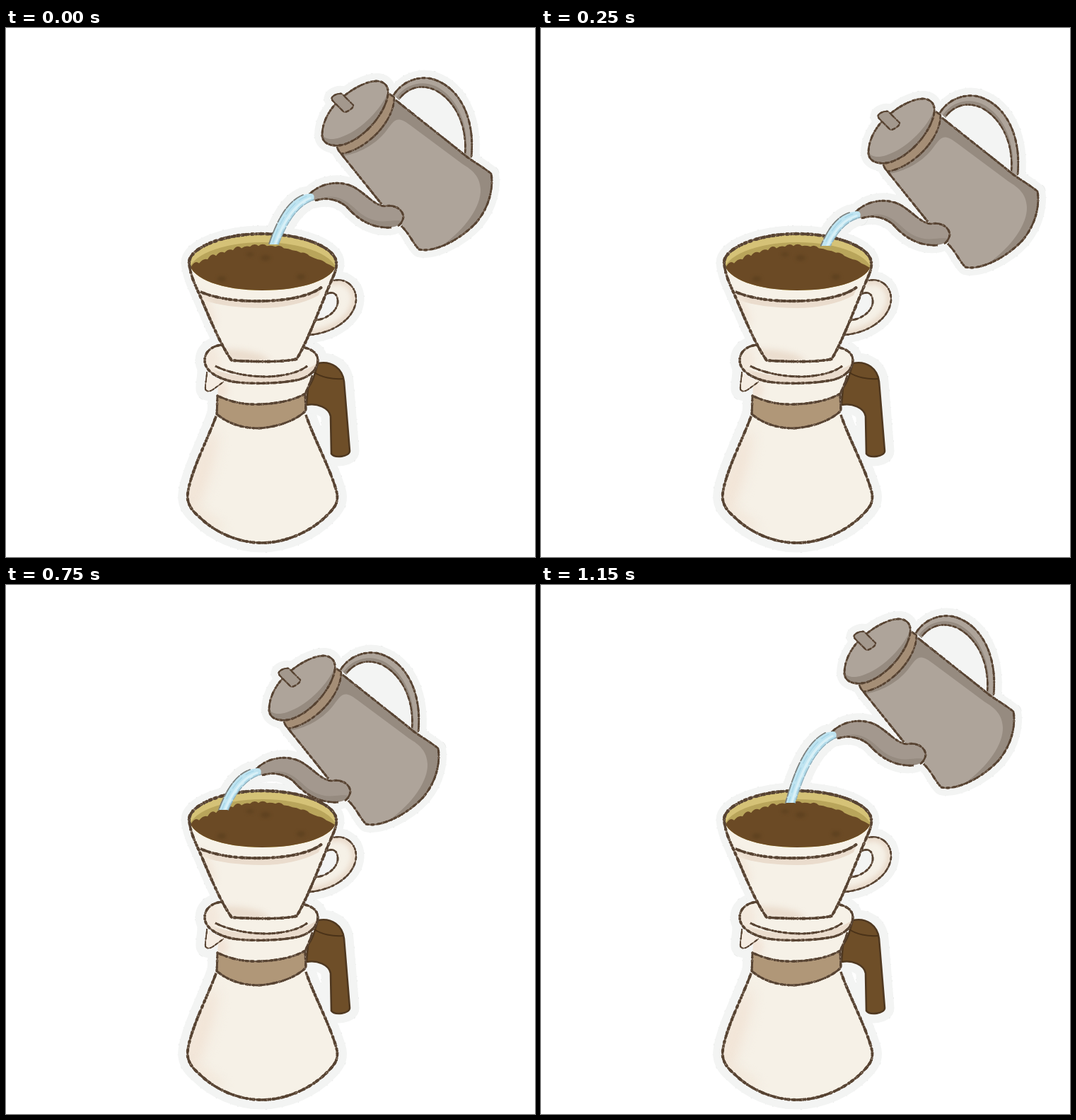
Animation of 748x748 px, one loop 1.25 s. Source, as an HTML page with a canvas:

```html
<!DOCTYPE html>
<html lang="en">
<head>
<meta charset="utf-8">
<title>Pour-over coffee</title>
<style>
html, body { margin: 0; width: 100%; height: 100%; overflow: hidden; background: #fff; }
canvas { display: block; width: 100vw; height: 100vh; }
</style>
</head>
<body>
<canvas id="stage" width="748" height="748"></canvas>
<script>
const ctx = document.getElementById('stage').getContext('2d');
const P = d => new Path2D(d);
const STEP = 250;

const CREAM = '#f6f1e7', TAN = '#eadccd', LINE = '#574332';
const STEEL = '#aea49a', SHADE = '#968b80', HALO = '#f3f4f3';

// Kettle offset and the point where the water lands
const poses = [
  { dx: 0, dy: 0, x: 378, y: 306 },
  { dx: 16, dy: 25, x: 402, y: 308 },
  { dx: -30, dy: 19, x: 354, y: 307 },
  { dx: -75, dy: 25, x: 307, y: 318 },
  { dx: -18, dy: -27, x: 352, y: 308 }
];

// Seeded dash pattern for the grain of the pencil
function grain(seed, on, off) {
  const rnd = () => (seed = seed * 16807 % 2147483647) / 2147483647;
  return Array.from({ length: 60 }, (_, i) => (0.3 + 1.4 * rnd()) * (i % 2 ? off : on));
}
const DARK = grain(71, 9, 2), FLECK = grain(5, 1.4, 13), ROUGH = grain(913, 3, 4);

const cup = {
  cone: P('M259 332 C258 312 305 291 362 291 C420 291 468 311 467 333 C467 342 462 351 459 360 C444 395 426 444 411 468 C390 473 350 472 319 470 C300 443 285 402 270 369 C264 356 260 345 259 332Z'),
  mouth: P('M259 332 C258 312 305 291 362 291 C420 291 468 311 467 333 C465 355 420 371 362 371 C307 371 262 355 259 332Z'),
  rim: P('M259 332 C258 312 305 291 362 291 C420 291 468 311 467 333'),
  sides: P('M259 332 C260 345 264 356 270 369 C285 402 300 443 319 470 C350 472 390 473 411 468 C426 444 444 395 459 360 C464 348 468 341 467 333'),
  lip: P('M275 373 C300 384 335 387 366 386 C402 385 432 378 447 366'),
  lipShade: P('M274 373 C300 384 335 387 366 386 C402 385 432 378 447 366 L442 378 C420 390 390 396 362 396 C330 396 300 392 280 385Z'),
  handle: P('M461 357 C480 352 496 365 495 385 C493 411 462 432 427 434 L439 411 C452 411 466 402 469 389 C470 377 463 371 453 376Z'),
  handleOut: P('M463 357 C481 353 496 366 495 385 C493 411 462 432 428 434'),
  handleIn: P('M454 376 C464 371 470 378 469 389 C467 402 452 412 438 413'),
  hole: P('M453 376 C464 371 470 378 469 389 C467 402 452 412 438 413Z')
};

const pot = {
  flask: P('M297 547 C286 580 261 627 257 658 C255 671 262 682 273 691 C295 713 328 728 362 728 C398 728 434 710 455 688 C466 677 470 670 468 658 C460 625 435 580 424 545Z'),
  flaskLine: P('M297 549 C286 580 261 627 257 658 C255 671 262 682 273 691 C295 713 328 728 362 728 C398 728 434 710 455 688 C466 677 470 670 468 658 C460 625 435 580 424 547'),
  neck: P('M301 490 L299 524 C340 536 390 533 423 519 C426 506 433 497 435 482Z'),
  neckRight: P('M433 491 C431 501 426 508 423 518'),
  band: P('M299 520 C320 530 340 533 360 532 C385 531 408 526 423 517 L424 541 C410 555 385 564 358 566 C335 566 315 560 298 546Z'),
  collar: P('M281 470 C281 459 289 451 302 449 L419 451 C433 454 441 460 441 470 C440 483 431 492 415 497 C390 503 345 504 320 500 C298 495 281 485 281 470Z'),
  collarLine: P('M305 448 C289 450 281 459 281 470 C281 485 298 495 320 500 C345 504 390 503 415 497 C431 492 440 483 441 470 C441 460 432 453 417 451'),
  collarIn: P('M296 478 C318 489 345 493 370 493 C395 492 414 487 426 478'),
  collarShade: P('M283 478 C310 492 345 494 370 493 C400 492 422 486 440 474 C437 489 425 495 415 497 C390 503 345 504 320 500 C300 496 286 489 283 478Z'),
  spout: P('M284 485 C284 495 281 505 282 511 C284 515 289 514 293 511 L309 500 C298 496 288 491 284 485Z'),
  spoutLine: P('M284 486 C284 495 281 505 282 511 C284 515 289 514 293 511 L308 500'),
  grip: P('M441 474 C461 470 476 482 478 500 L486 598 C486 606 465 609 460 602 L459 549 C457 537 440 530 425 533 L427 509 C434 500 435 493 437 488 Z'),
  gripFold: P('M436 487 C446 494 462 497 476 496')
};

const kettle = {
  body: P('M467 166 L474 178 L533 250 L562 281 C570 290 575 304 584 313 C604 318 641 301 665 275 C686 250 689 221 686 206 C670 193 656 187 643 175 L549 101Z'),
  bodyLine: P('M474 178 L531 249 M559 280 C570 290 575 304 584 313 C604 318 641 301 665 275 C686 250 689 221 686 206 C670 193 656 187 643 175 L551 102'),
  bodyShade: P('M549 100 L643 175 C656 187 670 193 686 206 C690 225 684 252 665 275 C650 292 630 303 616 308 C650 284 672 252 671 228 C670 210 660 201 645 192 L571 137 C553 124 550 129 538 145 C525 162 504 176 477 181 L474 178 C516 168 545 130 549 100Z'),
  band: P('M467 166 C500 166 538 125 540 92 L549 98 C549 132 510 172 474 178 C471 175 469 171 467 166Z'),
  bandLine: P('M468 168 C469 172 471 175 474 178 C510 172 549 132 549 98 L542 93'),
  lid: P('M447 152 C447 135 455 118 470 103 C487 87 510 74 526 75 C540 77 543 88 538 103 C530 128 505 155 480 164 C465 169 448 166 447 152Z'),
  lidShade: P('M447 150 C450 157 459 159 472 155 C500 146 526 119 538 96 L538 103 C530 128 505 155 480 164 C465 169 448 166 447 150Z'),
  knob: P('M461 98 C464 94 471 92 475 93 L491 109 C492 113 483 119 478 119 L463 104 C461 102 460 100 461 98Z'),
  handle: P('M548 95 C560 75 585 66 606 73 C645 87 663 132 658 185 L649 179 C652 138 635 101 605 87 C588 80 570 84 556 102Z'),
  handleShade: P('M552 98 C566 78 589 74 607 82 C638 97 655 136 651 180 L648 178 C652 138 635 101 605 87 C588 80 570 84 556 102Z'),
  handleOut: P('M548 95 C560 75 585 66 606 73 C645 87 663 132 658 183'),
  handleIn: P('M557 99 C570 83 588 80 605 87 C635 101 652 138 649 177'),
  loop: P('M549 98 C560 75 585 66 606 73 C645 87 663 132 658 185 L645 178Z'),
  spout: P('M429 235 C445 219 470 215 490 224 C508 233 519 250 535 252 C547 249 561 255 562 267 C561 276 550 282 540 282 C515 284 495 268 481 252 C468 242 453 239 436 244 C431 243 428 239 429 235Z'),
  spoutLine: P('M429 235 C445 219 470 215 490 224 C508 233 519 250 535 252 C547 249 561 255 562 267 C561 273 558 278 554 280 M545 282 C515 284 495 268 481 252 C468 242 453 239 437 244'),
  spoutShade: P('M440 242 C462 234 477 240 491 253 C508 270 523 275 540 273 C549 272 556 272 560 273 C556 280 548 282 540 282 C515 284 495 268 481 252 C468 242 453 239 440 242Z')
};

function fill(path, color) {
  ctx.fillStyle = color;
  ctx.fill(path);
}

function stroke(path, color, width, dash = []) {
  ctx.strokeStyle = color;
  ctx.lineWidth = width;
  ctx.setLineDash(dash);
  ctx.stroke(path);
  ctx.setLineDash([]);
}

// Dry pencil line: solid core, uneven dark edge, a few pale flecks
function ink(path, w = 3.4) {
  ctx.lineCap = 'butt';
  stroke(path, '#6f5c4c', w * 0.8);
  stroke(path, LINE, w, DARK);
  stroke(path, LINE, w * 1.2, ROUGH);
  stroke(path, '#9c8a79', w * 0.4, FLECK);
  ctx.lineCap = 'round';
}

function halo(paths, width) {
  ctx.lineCap = 'butt';
  for (const p of paths) stroke(p, '#e3e4e3', width + 1, FLECK);
  ctx.lineCap = 'round';
  for (const p of paths) {
    stroke(p, HALO, width);
    fill(p, HALO);
  }
}

function within(path, draw) {
  ctx.save();
  ctx.clip(path);
  draw();
  ctx.restore();
}

function blot(x, y, rx, ry, color, blur = 0, turn = 0) {
  ctx.save();
  if (blur) ctx.filter = `blur(${blur}px)`;
  ctx.fillStyle = color;
  ctx.beginPath();
  ctx.ellipse(x, y, rx, ry, turn, 0, 7);
  ctx.fill();
  ctx.restore();
}

// Coffee with a scalloped upper edge
function groundsPath() {
  const p = P('M261 343');
  const n = 17;
  let px = 261;
  for (let i = 0; i <= n; i++) {
    const u = i / n * 2 - 1;
    const x = 363 + 102 * u;
    const y = 308 + 31 * Math.pow(Math.abs(u), 1.8);
    p.quadraticCurveTo((x + px) / 2, y - 4 - 2 * Math.sin(i * 2.4), x, y);
    px = x;
  }
  p.bezierCurveTo(463, 358, 418, 371, 362, 371);
  p.bezierCurveTo(308, 371, 266, 357, 261, 343);
  return p;
}
const grounds = groundsPath();

function drawPot() {
  fill(pot.grip, '#6e4e28');
  stroke(pot.grip, '#4f3820', 2.6);
  stroke(pot.gripFold, '#4a3218', 2);

  fill(pot.flask, CREAM);
  within(pot.flask, () => {
    blot(272, 640, 12, 75, '#f1e3d5', 9, 0.32);
    blot(284, 693, 30, 6, '#f2e6d8', 7, 0.6);
  });
  ink(pot.flaskLine);

  fill(pot.neck, CREAM);
  within(pot.neck, () => blot(302, 512, 12, 12, '#f1e3d6', 5));
  ink(pot.neckRight, 2.4);
  fill(pot.band, '#b09778');
  ink(pot.band, 2.8);

  fill(pot.spout, '#f5ece2');
  ink(pot.spoutLine, 1.7);
  fill(pot.collar, CREAM);
  fill(pot.collarShade, TAN);
  within(pot.collar, () => blot(290, 470, 12, 18, '#f3e8dc', 5));
  ink(pot.collarLine, 3);
  ink(pot.collarIn, 2.6);
}

function drawCup() {
  fill(cup.handle, CREAM);
  within(cup.handle, () => {
    ctx.filter = 'blur(3px)';
    stroke(cup.handleOut, TAN, 14);
  });
  ink(cup.handleOut, 2.2);
  fill(cup.hole, HALO);
  ink(cup.handleIn, 2.4);

  fill(cup.cone, CREAM);
  within(cup.cone, () => {
    fill(cup.lipShade, TAN);
    blot(334, 464, 38, 8, TAN, 4, 0.15);
    blot(285, 397, 7, 26, '#f2e7da', 5, -0.4);
  });
  ink(cup.lip);

  fill(cup.mouth, '#d5c277');
  within(cup.mouth, () => {
    blot(363, 346, 105, 43, '#b9a55b');
    fill(grounds, '#6b4a25');
    const spots = [[367, 325, 7, 4], [305, 355, 6, 4], [417, 352, 6, 4], [345, 320, 5, 3]];
    for (const [x, y, rx, ry] of spots) blot(x, y, rx, ry, '#5f4220', 2);
  });
  ink(cup.sides);
  ink(cup.rim, 3.8);
}

function drawKettle() {
  fill(kettle.handle, STEEL);
  fill(kettle.handleShade, SHADE);
  ink(kettle.handleOut, 2.5);
  ink(kettle.handleIn, 2.1);

  fill(kettle.body, STEEL);
  fill(kettle.bodyShade, SHADE);
  ink(kettle.bodyLine, 2.6);

  fill(kettle.band, '#a58e76');
  ink(kettle.bandLine, 2.3);
  fill(kettle.lid, STEEL);
  fill(kettle.lidShade, SHADE);
  ink(kettle.lid, 2.5);
  fill(kettle.knob, '#a3988d');
  ink(kettle.knob, 2);

  fill(kettle.spout, '#a3988e');
  fill(kettle.spoutShade, SHADE);
  ink(kettle.spoutLine, 2.5);
}

// Curve from the spout to the grounds, shifted sideways by a and b
function flow(path, pose, a, b, back) {
  const x0 = 427 + pose.dx + a, y0 = 239 + pose.dy + b;
  const x3 = pose.x + a * 0.9, y3 = pose.y;
  const w = x3 - x0, h = y3 - y0;
  const c1 = [x0 + w * 0.48, y0 + h * 0.13];
  const c2 = [x3 - w * 0.22, y3 - h * 0.46];
  if (back) {
    path.lineTo(x3, y3);
    path.bezierCurveTo(...c2, ...c1, x0, y0);
  } else {
    path.moveTo(x0, y0);
    path.bezierCurveTo(...c1, ...c2, x3, y3);
  }
  return path;
}
const streak = (pose, a, b) => flow(new Path2D(), pose, a, b);

function waterPath(pose) {
  const p = streak(pose, -7, -3);
  flow(p, pose, 8, 4, true);
  const x = 434 + pose.dx, y = 238 + pose.dy;
  p.bezierCurveTo(x + 2, y + 2, x + 3, y - 4, x - 4, y - 4);
  p.closePath();
  return p;
}

function drawWater(pose, path) {
  fill(path, '#bfe4f1');
  within(path, () => {
    stroke(streak(pose, 3, 2), '#d8f0f7', 3.5);
    stroke(streak(pose, -2, -1), '#a9d7e9', 1.5, [12, 7, 20, 5]);
    stroke(streak(pose, 6, 3), '#add9e9', 1.6, [9, 6]);
  });
  stroke(streak(pose, -7, -3), '#7c817f', 1.8, DARK);
  stroke(streak(pose, 8, 4), '#8eafbd', 1.4, DARK);
}

function draw(pose) {
  const water = waterPath(pose);
  const shifted = fn => {
    ctx.save();
    ctx.translate(pose.dx, pose.dy);
    fn();
    ctx.restore();
  };
  ctx.fillStyle = '#fff';
  ctx.fillRect(0, 0, 748, 748);
  ctx.lineJoin = ctx.lineCap = 'round';

  halo([pot.flask, pot.band, pot.neck, pot.grip, pot.collar, pot.spout], 27);
  halo([cup.cone, cup.handle], 23);
  shifted(() => halo([kettle.body, kettle.lid, kettle.knob, kettle.loop, kettle.spout], 22));
  halo([water], 22);

  drawPot();
  drawCup();
  shifted(drawKettle);
  drawWater(pose, water);
}

let shown = -1;
function tick(now) {
  const i = Math.floor(now / STEP) % poses.length;
  if (i !== shown) draw(poses[shown = i]);
  requestAnimationFrame(tick);
}
draw(poses[shown = 0]);
requestAnimationFrame(tick);
</script>
</body>
</html>
```
